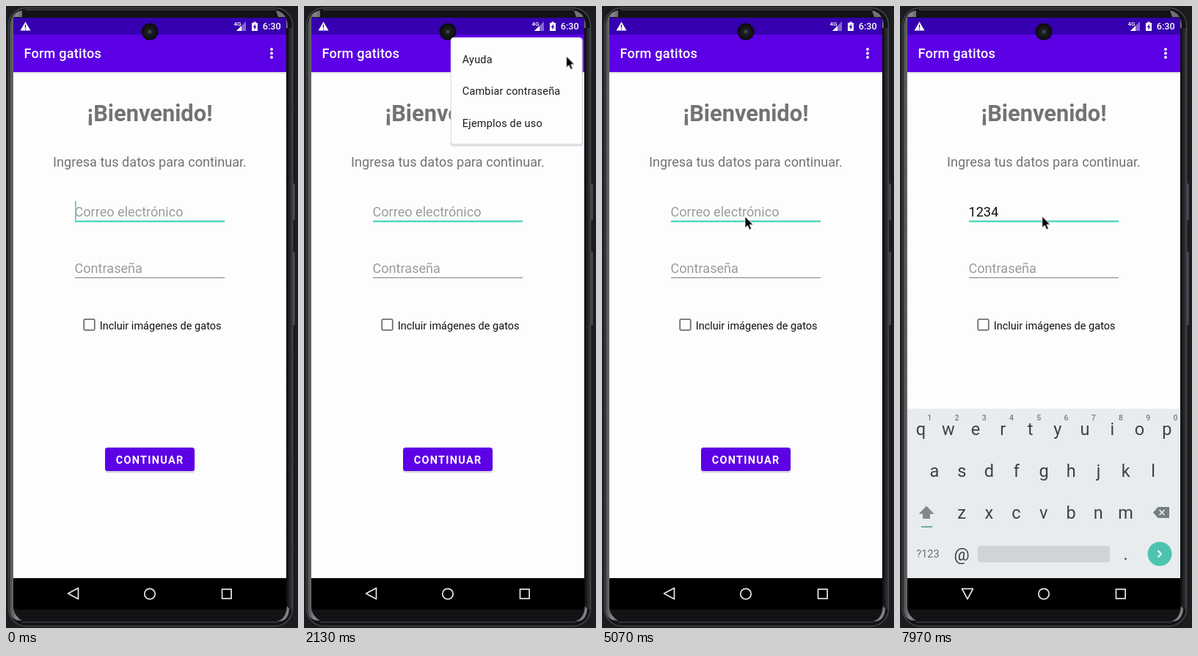
An HTML page for the animation above (8000 ms loop, 398 by 848 pixels).

```html
<!DOCTYPE html>
<html lang="es">
<head>
<meta charset="utf-8">
<title>Formulario</title>
<style>
html, body { margin: 0; width: 100%; height: 100%; overflow: hidden; background: #1b1c1f; }
svg { display: block; width: 398px; height: 848px; }
text { font-family: Roboto, sans-serif; white-space: pre; }
.mid { text-anchor: middle; }
.body { font-size: 18.1px; }
.small { font-size: 14.48px; }
.hint { fill: #9b9b9e; }
.line { fill: none; stroke: #e8e8ea; stroke-width: 1.7; }
.key { font-size: 23.5px; fill: #38444a; text-anchor: middle; }
.digit { font-size: 10.5px; fill: #737d82; text-anchor: middle; font-weight: 500; }

.anim { animation: 8s linear infinite; }
.step { animation: 8s step-end infinite; }
#pointer { animation-name: pointer; }
#menu { animation-name: menu; opacity: 0; }
#keyboard { animation-name: keyboard; }
#back { animation-name: back; transform-origin: 92px 801px; }
#caret { animation-name: blink; }
#caretShift { animation-name: caretShift; }
#emailHint { animation-name: hideHint; }
#d1 { animation-name: type1; }
#d2 { animation-name: type2; }
#d3 { animation-name: type3; }
#d4 { animation-name: type4; }

@keyframes pointer {
  0%, 14% { transform: translate(420px, 250px); }
  16% { transform: translate(386px, 150px); animation-timing-function: ease-out; }
  19%, 25% { transform: translate(367px, 68px); animation-timing-function: ease-in-out; }
  33%, 38% { transform: translate(257px, 73px); animation-timing-function: ease-in-out; }
  41.5%, 43.5% { transform: translate(260px, 116px); animation-timing-function: ease-in-out; }
  47%, 49% { transform: translate(260px, 159px); animation-timing-function: ease-in-out; }
  56%, 64% { transform: translate(195px, 287px); }
  65.5%, 100% { transform: translate(193.7px, 286.7px); }
}
@keyframes menu {
  0%, 21.9% { opacity: 0; }
  22.5% { opacity: .23; }
  24.4%, 57.6% { opacity: 1; }
  59.4%, 100% { opacity: 0; }
}
@keyframes keyboard {
  0%, 66.5% { transform: translateY(232px); animation-timing-function: cubic-bezier(0, 0, .2, 1); }
  70.2%, 100% { transform: none; }
}
@keyframes back {
  0%, 66.8% { transform: none; }
  69%, 100% { transform: rotate(-90deg); }
}
@keyframes blink {
  0% { opacity: 1; }
  .9% { opacity: 0; }
  6.9% { opacity: 1; }
  13.2% { opacity: 0; }
  19.4% { opacity: 1; }
  21.9% { opacity: 0; }
  66% { opacity: 1; }
  72.3% { opacity: 0; }
  78.5% { opacity: 1; }
  98.5% { opacity: 0; }
}
@keyframes caretShift {
  0% { transform: none; }
  84.7% { transform: translateX(10.2px); }
  87.2% { transform: translateX(20.3px); }
  89.7% { transform: translateX(30.5px); }
  92.2% { transform: translateX(40.7px); }
}
@keyframes hideHint { 0% { opacity: 1; } 84.7%, 100% { opacity: 0; } }
@keyframes type1 { 0% { opacity: 0; } 84.7%, 100% { opacity: 1; } }
@keyframes type2 { 0% { opacity: 0; } 87.2%, 100% { opacity: 1; } }
@keyframes type3 { 0% { opacity: 0; } 89.7%, 100% { opacity: 1; } }
@keyframes type4 { 0% { opacity: 0; } 92.2%, 100% { opacity: 1; } }
</style>
</head>
<body>
<svg viewBox="0 0 398 848">
  <defs>
    <linearGradient id="edge" x2="1" y2="0">
      <stop offset="0" stop-color="#48494c"/>
      <stop offset=".55" stop-color="#88898b"/>
      <stop offset="1" stop-color="#67686b"/>
    </linearGradient>
    <linearGradient id="rim" x2="1" y2="0">
      <stop offset="0" stop-color="#0a0a0c"/>
      <stop offset="1" stop-color="#36383d"/>
    </linearGradient>
    <radialGradient id="lens">
      <stop offset="0" stop-color="#56575a"/>
      <stop offset=".3" stop-color="#1d1e20"/>
      <stop offset="1" stop-color="#0b0b0d"/>
    </radialGradient>
    <clipPath id="page"><rect x="10" y="90" width="372" height="690"/></clipPath>
  </defs>

  <!-- phone body -->
  <rect width="398" height="848" fill="#1b1c1f"/>
  <path d="M392.500 242v50M392.500 335v100" stroke="#55575c" stroke-width="2"/>
  <rect x="3.500" y="2.500" width="387" height="843" rx="24" fill="#121315" stroke="#45474b" stroke-width="1.500"/>
  <path d="M26 5H368" stroke="#36383c" stroke-width="2"/>
  <path d="M5 824V28Q6 9 22 6V15H10V822Q12 832 22 838Q6 838 5 824Z" fill="url(#edge)"/>
  <path d="M368 6Q384 9 384 30H381V15H371Z" fill="#717275"/>
  <rect x="382" y="30" width="8" height="792" fill="url(#rim)"/>
  <path d="M383 818Q382 836 369 839Q385 840 386 822Z" fill="#808184"/>
  <path d="M22 840H370" stroke="#2e3034" stroke-width="2"/>

  <!-- page -->
  <rect x="10" y="90" width="372" height="690" fill="#fdfdfd"/>
  <text class="mid" x="196" y="157" font-size="30.800" font-weight="700" fill="#737375">¡Bienvenido!</text>
  <text class="mid body" x="196" y="218.500" fill="#737375">Ingresa tus datos para continuar.</text>

  <text id="emailHint" class="body hint step" x="93.500" y="286.500">Correo electrónico</text>
  <g class="body" fill="#111112">
    <text id="d1" class="step" x="93.500" y="286.500">1</text>
    <text id="d2" class="step" x="103.700" y="286.500">2</text>
    <text id="d3" class="step" x="113.800" y="286.500">3</text>
    <text id="d4" class="step" x="124" y="286.500">4</text>
  </g>
  <rect x="94" y="292.500" width="204" height="2.200" fill="#43cfb9"/>
  <g id="caretShift" class="step"><rect id="caret" class="step" x="94" y="266" width="1.700" height="26" fill="#4fd0bd"/></g>

  <text class="body hint" x="93.500" y="364">Contraseña</text>
  <rect x="94" y="370" width="204" height="1" fill="#7e7e86"/>

  <rect x="106.200" y="427.200" width="14.600" height="14.600" rx="1.500" fill="none" stroke="#717175" stroke-width="1.800"/>
  <text class="small" x="127.700" y="440.500" fill="#111112" letter-spacing=".020">Incluir imágenes de gatos</text>

  <rect x="135" y="604" width="122.500" height="32.500" rx="4" fill="#cfcfd4" opacity=".8"/>
  <rect x="135" y="602" width="122" height="32" rx="3.500" fill="#5c00e6"/>
  <text class="small" x="149.700" y="624" font-weight="700" letter-spacing="1.290" fill="#fdfdfd">CONTINUAR</text>

  <!-- app bar and status bar -->
  <rect x="10" y="89" width="372" height="3" fill="#cacad0" opacity=".6"/>
  <rect x="10" y="38" width="372" height="52" fill="#5c00e6"/>
  <rect x="10" y="16" width="372" height="23" fill="#3600b0"/>
  <text class="body" x="24.500" y="71" font-weight="500" letter-spacing=".230" fill="#fdfdfd">Form gatitos</text>
  <g fill="#fdfdfd">
    <circle cx="362" cy="59" r="1.900"/><circle cx="362" cy="64.500" r="1.900"/><circle cx="362" cy="70" r="1.900"/>
    <path d="M26.500 21.500L33.500 33.500H19.500Z"/>
    <text x="310.500" y="27" font-size="8" font-weight="500">4G</text>
    <path d="M327 21V34H314Z" opacity=".4"/>
    <path d="M321 27V34H314Z"/>
    <path d="M337.500 21.500h3v1.500h2.500v11h-8v-11h2.500Z"/>
    <text x="349.800" y="32.300" font-size="12.700" font-weight="500">6:30</text>
  </g>
  <path d="M26.500 25.500v4M26.500 30.800v1.500" stroke="#3600b0" stroke-width="1.400"/>
  <path d="M339.800 24.500L336.800 29H338.500V32.500L341.300 28H339.800Z" fill="#3600b0"/>
  <circle cx="196" cy="35" r="11.500" fill="url(#lens)"/>

  <!-- overflow menu -->
  <g id="menu" class="anim">
    <rect x="199.500" y="44" width="181" height="147.500" rx="4" fill="#c8c8ce" opacity=".55"/>
    <rect x="200.500" y="43" width="178.500" height="145" rx="3.500" fill="#fdfdfd" stroke="#dedee2" stroke-width=".6"/>
    <g class="small" fill="#1c1c1e" letter-spacing=".2">
      <text x="215.800" y="77.500">Ayuda</text>
      <text x="215.800" y="121">Cambiar contraseña</text>
      <text x="215.800" y="164.500">Ejemplos de uso</text>
    </g>
  </g>

  <!-- on-screen keyboard -->
  <g clip-path="url(#page)">
    <g id="keyboard" class="anim">
      <rect x="10" y="549" width="372" height="231" fill="#e9ecee"/>
      <g id="keys"></g>
      <path d="M36 681.500L46.500 692.500H41V699H31V692.500H25.500Z" fill="#7f898d"/>
      <rect x="29" y="709.300" width="15" height="1.600" fill="#5b9c9a"/>
      <path d="M351.500 683H367V698H351.500L345 690.500Z" fill="#757f83"/>
      <path d="M353.500 687l7 7m0-7l-7 7" stroke="#e9ecee" stroke-width="1.700"/>
      <text class="mid" x="38" y="752" font-size="14.500" fill="#667075">?123</text>
      <rect x="106" y="736" width="180" height="22.500" rx="3" fill="#cfd4d6"/>
      <circle cx="354" cy="747" r="16.500" fill="#4dc4b0"/>
      <path d="M351.500 742.500l4.500 4.500-4.500 4.500" fill="none" stroke="#fdfdfd" stroke-width="1.900"/>
    </g>
  </g>

  <!-- navigation bar -->
  <path d="M10 780H382V820Q380 823 374 823H18Q12 823 10 820Z" fill="#000"/>
  <path id="back" class="line anim" d="M84.500 801L98.500 793.500V808.500Z" stroke-linejoin="round"/>
  <circle class="line" cx="196" cy="801.500" r="7.200"/>
  <rect class="line" x="294.500" y="795.200" width="12.600" height="12.600"/>

  <g id="pointer" class="anim">
    <path d="M0 0V15.500L3.500 12.300L5.900 18L8.600 16.800L6.200 11.200H10.800Z" fill="#000" stroke="#fdfdfd" stroke-width=".8"/>
  </g>
</svg>
<script>
const keys = document.getElementById('keys');
const PITCH = 37.25;

function addText(className, x, y, value) {
  const node = document.createElementNS('http://www.w3.org/2000/svg', 'text');
  node.setAttribute('class', className);
  node.setAttribute('x', x);
  node.setAttribute('y', y);
  node.textContent = value;
  keys.append(node);
}

function addRow(className, letters, x, y) {
  [...letters].forEach((letter, i) => addText(className, x + i * PITCH, y, letter));
}

addRow('key', 'qwertyuiop', 28.5, 585);
addRow('digit', '1234567890', 40.3, 565);
addRow('key', 'asdfghjkl', 47, 642);
addRow('key', 'zxcvbnm', 84, 699);
addText('key', 84, 756, '@');
addText('key', 307.5, 755, '.');
</script>
</body>
</html>
```
